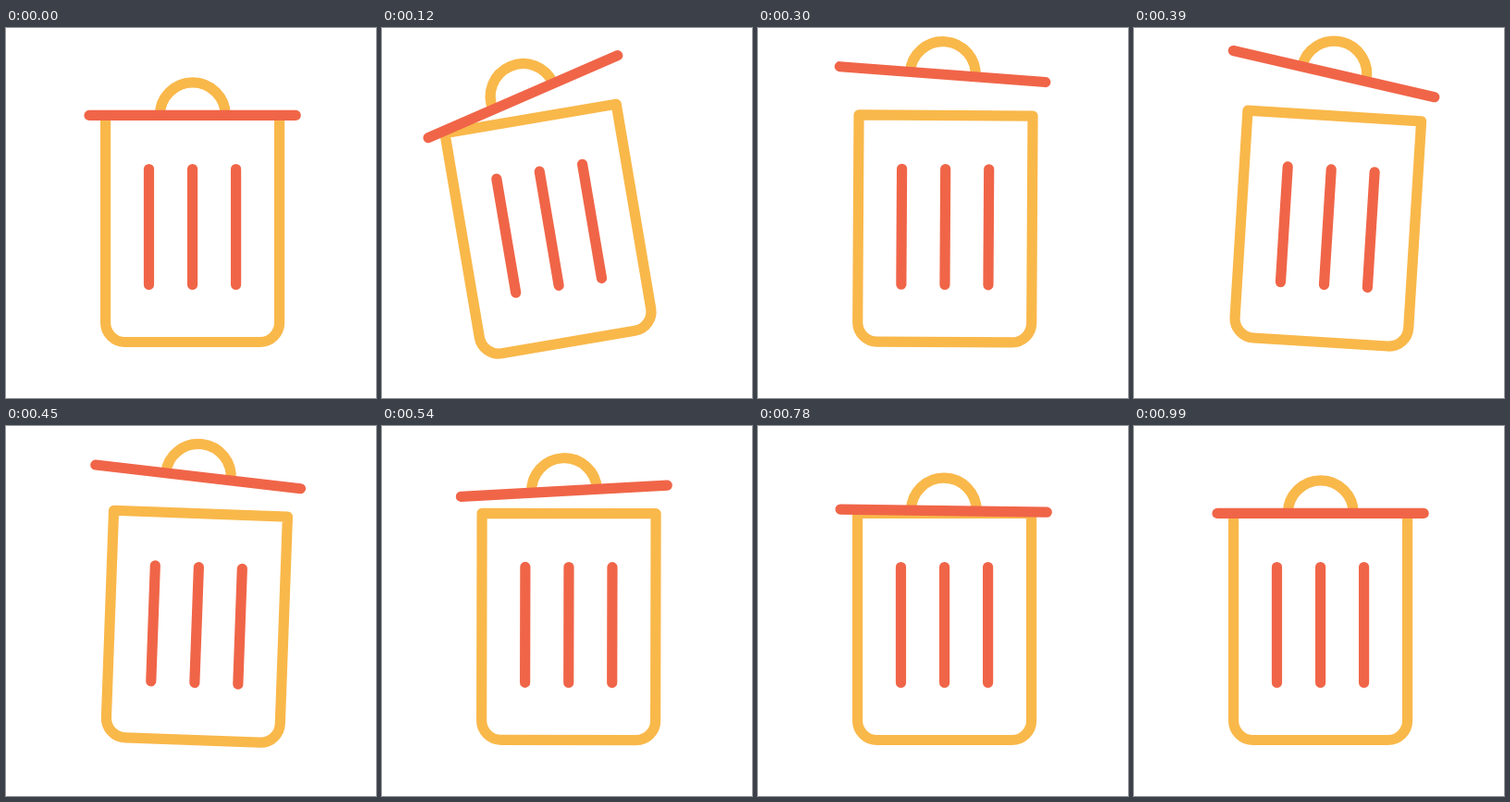
Recreate the animation shown at these times as an HTML page. Size 400 px wide and 400 px high, loop 3020 ms.

```html
<!DOCTYPE html>
<html lang="en">
<head>
<meta charset="utf-8">
<title>Trash can</title>
<style>
  html, body { margin: 0; width: 100%; height: 100%; overflow: hidden; background: #fff; }
  svg { display: block; width: 100vw; height: 100vh; fill: none; stroke-width: 11.2; stroke-linecap: round; stroke-linejoin: round; }
  .yellow { stroke: #f9b84a; }
  .red { stroke: #f06548; }
  .handle { stroke-linecap: butt; }

  /* The script seeks these, so they stay paused. */
  .can, .drift, .lid { animation: 1s ease both paused; }
  .can { transform-origin: 201.6px 340px; animation-name: tilt; }
  .drift { animation-name: drift; animation-timing-function: linear; }
  .lid { transform-origin: 201.6px 94.5px; animation-name: hop, swing; }

  @keyframes tilt {
    0% { rotate: 0deg; }
    20.5% { rotate: -11deg; }
    40.5% { rotate: 3.6deg; }
    58%, 100% { rotate: 0deg; }
  }
  @keyframes drift {
    0% { translate: 0 0; }
    12% { translate: -4px 0; }
    39% { translate: -3.6px 0; }
    54% { translate: -5.3px 0; }
    78% { translate: -0.9px 0; }
    99%, 100% { translate: 0 0; }
  }
  @keyframes hop {
    0% { translate: 0 0; }
    38% { translate: 0 -45.5px; }
    95.5%, 100% { translate: 0 0; }
  }
  @keyframes swing {
    0% { rotate: 0deg; }
    20.3% { rotate: -15.8deg; }
    40.5% { rotate: 9.5deg; }
    60% { rotate: -4.1deg; }
    80% { rotate: 0.8deg; }
    99%, 100% { rotate: 0deg; }
  }
</style>
</head>
<body>
<svg viewBox="0 0 400 400">
  <g class="can">
    <path class="yellow" d="M107.6 94.5H295.6V318.5a21 21 0 0 1-21 21H128.6a21 21 0 0 1-21-21Z"/>
    <path class="red" d="M154.5 152.5v125M201.6 152.5v125M248.6 152.5v125"/>
    <g class="drift">
      <g class="lid">
        <path class="yellow handle" d="M166.4 94.3a35.4 35.4 0 0 1 70.8 0"/>
        <path class="red" d="M90 94.4H313.2"/>
      </g>
    </g>
  </g>
</svg>
<script>
  const LOOP = 3020, STEP = 30, REST = 990;
  const parts = document.getAnimations();
  const start = performance.now();

  function draw() {
    const t = (performance.now() - start) % LOOP;
    const pose = Math.min(Math.floor(t / STEP) * STEP, REST);
    for (const part of parts) part.currentTime = pose;
    requestAnimationFrame(draw);
  }
  draw();
</script>
</body>
</html>
```
